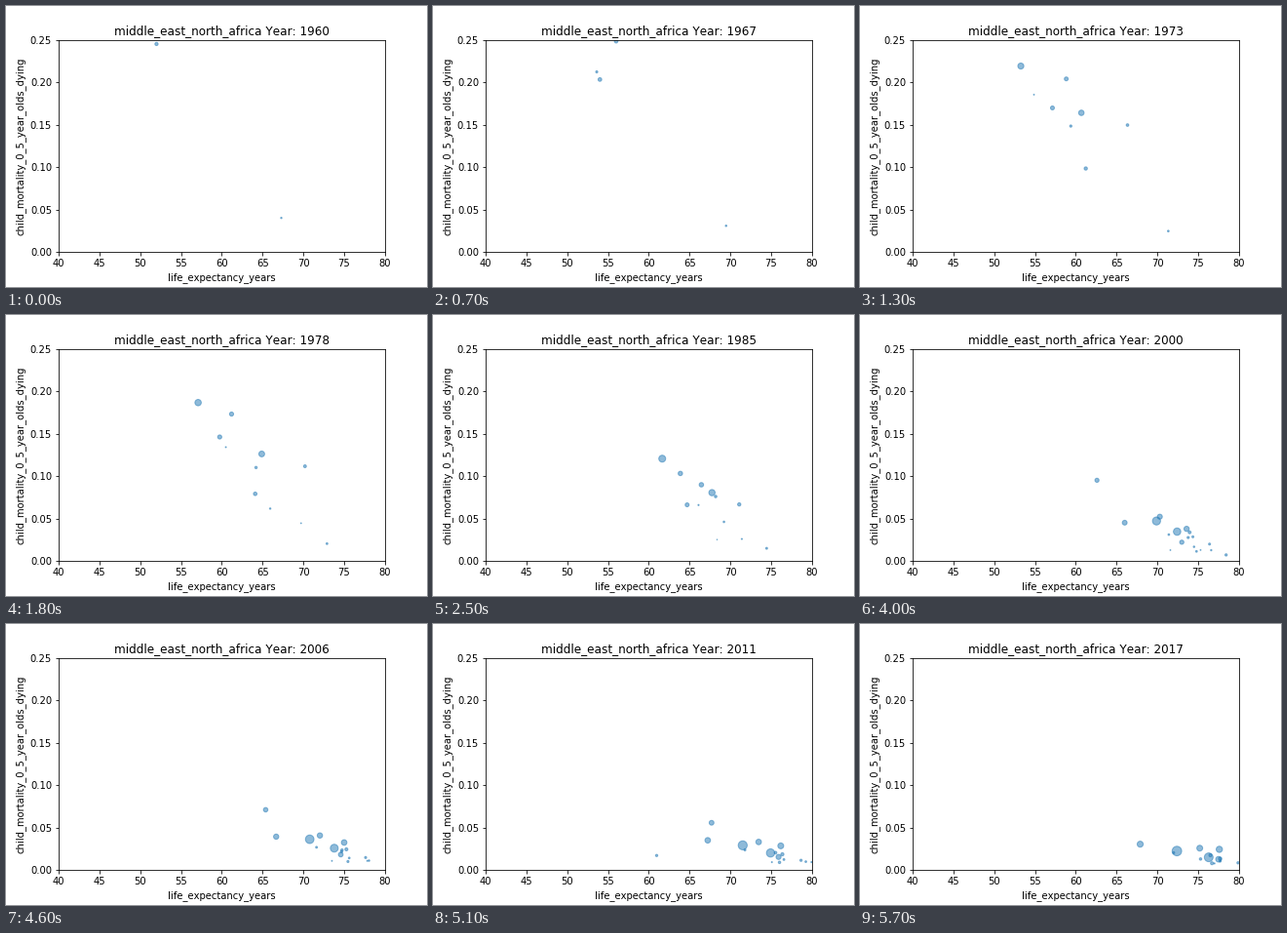
These frames come from a looping animation (432 px wide and 288 px high, 5.8 s). A matplotlib script:

```python
import numpy as np
import matplotlib.pyplot as plt
from matplotlib.animation import FuncAnimation

FIRST, LAST = 1960, 2017
REGION = "middle_east_north_africa"
countries = []


def add(pop_first, pop_last, *keys, shock=(0, 0)):
    """Population in millions, key (year, life, deaths per 1000), one-year loss of life."""
    countries.append((pop_first, pop_last, *np.array(keys, float).T, shock))


# Algeria, Israel, Morocco, Tunisia
add(11, 41, (1960, 52, 245), (1967, 56, 248.2), (1978, 61.2, 173),
    (1992, 71.7, 46.5), (2017, 77.6, 24.2))
add(2.1, 8.3, (1960, 67.3, 40), (1978, 72.9, 20.3), (1992, 76, 10.8), (2017, 83.6, 2.8))
add(12, 36, (1962, 51.4, 236), (1978, 59.75, 146), (1992, 68, 72.7), (2017, 75.2, 25.6))
add(4.2, 11.5, (1965, 51.7, 239), (1978, 64.2, 110), (1992, 72.2, 52.3), (2017, 77.7, 13.2))
# Egypt, Iran, Iraq, Saudi Arabia
add(27, 96, (1969, 50.2, 249), (1978, 57.1, 186.5), (1992, 66.2, 77.8),
    (2000, 69.9, 47), (2017, 72.4, 22.2))
add(22, 81, (1971, 59, 182), (1978, 64.9, 126), (1992, 70.6, 51.3), (2017, 76.3, 14.8))
add(7.3, 38, (1970, 59.5, 112), (1978, 64.1, 79), (2000, 66, 45), (2017, 67.9, 30.3),
    shock=(1988, 15))
add(4.1, 33, (1971, 64.8, 168), (1978, 70.2, 111.5), (2000, 73, 22), (2017, 77.5, 12.5))
# Oman, United Arab Emirates, Jordan, Bahrain
add(0.55, 4.6, (1970, 51.5, 225), (1978, 60.5, 134), (1992, 71.7, 32.3),
    (2000, 74.5, 16.6), (2017, 77.7, 10.3))
add(0.2, 9.5, (1975, 69, 56), (1992, 73.1, 15), (2000, 74.8, 11.2), (2017, 76.7, 7.8))
add(0.93, 9.7, (1976, 65, 67), (1992, 72.5, 34.3), (2017, 76.5, 17.2))
add(0.16, 1.5, (1980, 67.5, 27.5), (1992, 69.6, 22), (2000, 71.6, 12.7), (2017, 77, 7.6))
# Lebanon, Yemen, Palestine
add(1.8, 6.1, (1989, 70.3, 34), (2000, 76.4, 19.8), (2017, 79.9, 8.3))
add(5.2, 28, (1990, 58.7, 126), (2000, 62.6, 95), (2011, 67.7, 55.5), (2014, 68, 50))
add(1.1, 4.8, (1994, 71.2, 36), (2017, 72, 20.2))
# Kuwait, Libya, Qatar
add(0.27, 4.1, (1995, 75.4, 14.2), (2017, 80.7, 8.4))
add(1.4, 6.4, (1999, 74.3, 29.7), (2017, 75.3, 12.8), shock=(2011, 14))
add(0.05, 2.6, (2000, 75.3, 12.8), (2017, 82.5, 7.6))


def bubbles(year):
    """Life, mortality and population of every country with data in this year."""
    rows = []
    growth = ((year - FIRST) / (LAST - FIRST)) ** 0.88
    for p0, p1, years, life, deaths, (bad_year, loss) in countries:
        if years[0] <= year <= years[-1]:
            x = np.interp(year, years, life) - loss * (year == bad_year)
            y = np.exp(np.interp(year, years, np.log(deaths))) / 1000
            rows.append((x, y, p0 * (p1 / p0) ** growth))
    return np.array(rows)


plt.rcParams["text.kerning_factor"] = 6
fig, ax = plt.subplots(figsize=(6, 4), dpi=72)
fig.subplots_adjust(left=0.125, right=0.9, bottom=0.125, top=0.88)
ax.set(xlim=(40, 80), ylim=(0, 0.25), xlabel="life_expectancy_years",
       ylabel="child_mortality_0_5_year_olds_dying")
dots = ax.scatter([], [], color="tab:blue", alpha=0.5, linewidths=1)
title = ax.set_title("")


def update(i):
    data = bubbles(FIRST + i)
    dots.set_offsets(data[:, :2])
    dots.set_sizes(data[:, 2])
    title.set_text(f"{REGION} Year: {FIRST + i}")
    return dots, title


anim = FuncAnimation(fig, update, frames=LAST - FIRST + 1, interval=100,
                     repeat=True, repeat_delay=0)
plt.show()
```
